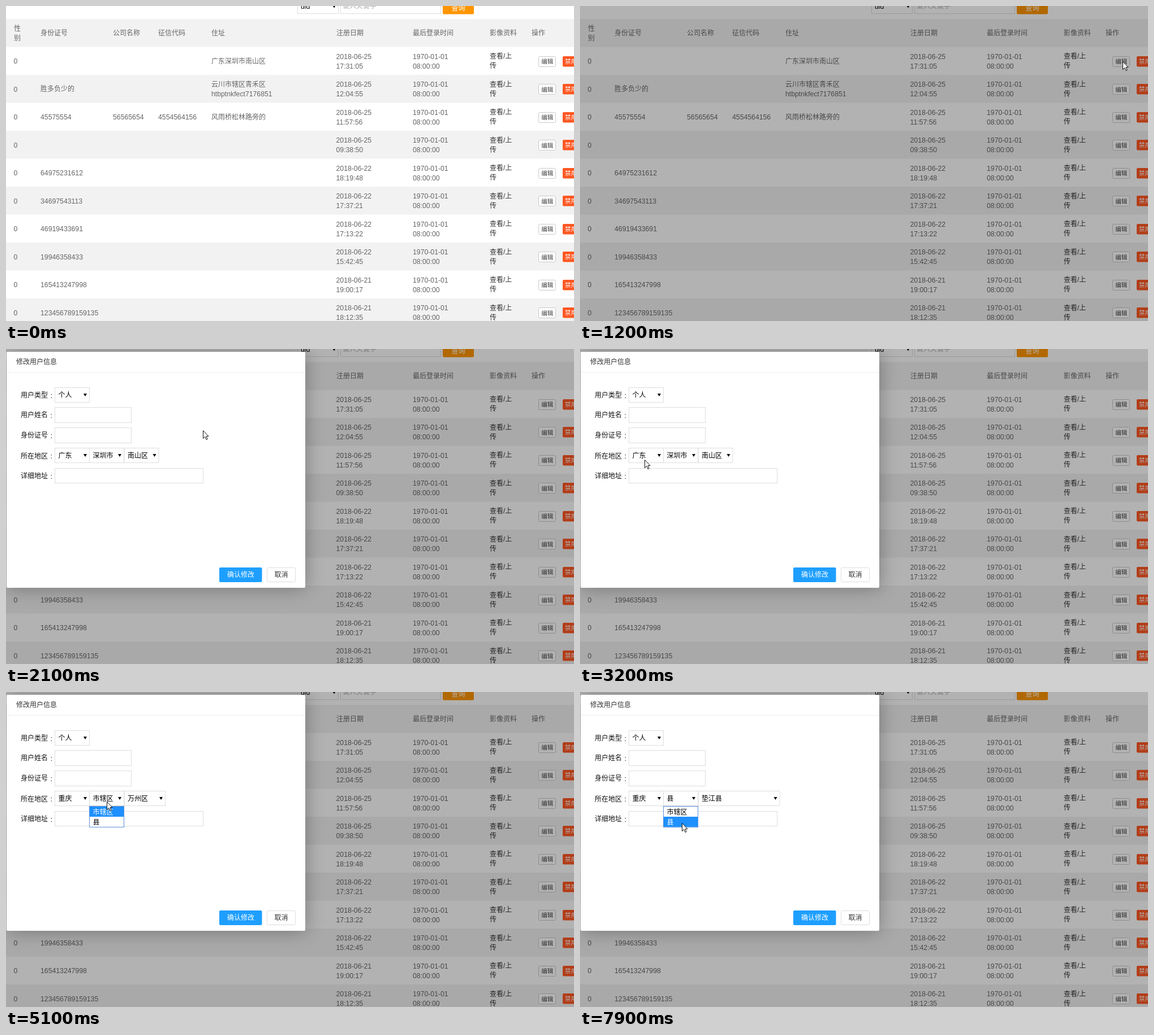
An HTML page that plays this animation: 1004x558 px, repeating every 8000 ms.

```html
<!DOCTYPE html>
<html lang="zh-CN">
<head>
<meta charset="utf-8">
<title>修改用户信息</title>
<style>
  html, body { margin: 0; width: 100%; height: 100%; overflow: hidden; background: #fff; }
  svg { display: block; width: 1004px; height: 558px;
        font-family: 'Liberation Sans', 'Noto Sans CJK SC', 'Noto Sans CJK', sans-serif; }
</style>
</head>
<body>
<svg id="stage" viewBox="0 0 1004 558"></svg>
<script>
const LOOP = 8000;
const stage = document.getElementById('stage');

function add(parent, tag, attrs = {}, content) {
  const el = document.createElementNS('http://www.w3.org/2000/svg', tag);
  for (const key in attrs) el.setAttribute(key, attrs[key]);
  if (content !== undefined) el.textContent = content;
  return parent.appendChild(el);
}
const group = parent => add(parent, 'g');
const fillRect = (parent, x, y, width, height, fill, rx = 0) =>
  add(parent, 'rect', { x, y, width, height, fill, rx });
const outline = (parent, x, y, w, h, stroke = '#dedede', fill = '#fff', rx = 0) =>
  add(parent, 'rect', { x: x + .5, y: y + .5, width: w - 1, height: h - 1, fill, stroke, rx });

// y is the vertical middle of the line
function label(parent, x, y, content, fill = '#666', size, anchor = 'start') {
  size = size || (/^[\x20-\x7e]+$/.test(content) ? 12.25 : 12);
  return add(parent, 'text',
    { x, y: y + size * .37, fill, 'font-size': size, 'text-anchor': anchor }, content);
}

// Hard steps: table of [time, value], starting at time 0
function play(el, prop, table) {
  const frames = table.map(([time, value]) =>
    ({ offset: time / LOOP, [prop]: value, easing: 'step-end' }));
  frames.push({ offset: 1, [prop]: table[table.length - 1][1] });
  el.animate(frames, { duration: LOOP, iterations: Infinity });
}
function show(el, from, to = LOOP) {
  const table = from > 0 ? [[0, 0], [from, 1]] : [[0, 1]];
  if (to < LOOP) table.push([to, 0]);
  play(el, 'opacity', table);
  return el;
}
const arrow = (parent, x, y) =>
  add(parent, 'path', { d: `M${x - 3} ${y - 2.5}h6l-3 5z`, fill: '#000' });

// Page behind the dialog
const ROW = 49.5, TOP = 72.5;
const ROWS = [
  { day: '25', time: '17:31:05', address: ['广东深圳市南山区'] },
  { day: '25', time: '12:04:55', id: '胜多负少的', address: ['云川市辖区青禾区', 'htbptnkfect7176851'] },
  { day: '25', time: '11:57:56', id: '45575554', company: '56565654', code: '4554564156',
    address: ['风雨桥松林路旁的'] },
  { day: '25', time: '09:38:50' },
  { day: '22', time: '18:19:48', id: '64975231612' },
  { day: '22', time: '17:37:21', id: '34697543113' },
  { day: '22', time: '17:13:22', id: '46919433691' },
  { day: '22', time: '15:42:45', id: '19946358433' },
  { day: '21', time: '19:00:17', id: '165413247998' },
  { day: '21', time: '18:12:35', id: '123456789159135' }
];
const page = group(stage);

function lines(x, y, list, fill) {
  list.forEach((s, i) => label(page, x, y + (i - (list.length - 1) / 2) * 17, s, fill));
}

function drawPage() {
  fillRect(page, 0, 0, 1004, 558, '#fff');
  outline(page, 515, -12, 73, 26);
  label(page, 521, 0, 'uid', '#000', 12.25);
  arrow(page, 580, 1);
  outline(page, 591, -12, 178, 26);
  label(page, 595, 0, '键入关键字', '#aaa');
  fillRect(page, 772, -12, 55, 26.5, '#ff9500', 2);
  label(page, 799.5, 3, '查询', '#fff', 12.25, 'middle');

  fillRect(page, 0, 23, 1004, 49.5, '#f2f2f2');
  const heads = [[61, '身份证号'], [189, '公司名称'], [269, '征信代码'], [363, '住址'],
    [584, '注册日期'], [719, '最后登录时间'], [855, '影像资料'], [929, '操作']];
  lines(14, 48, ['性', '别']);
  heads.forEach(([x, s]) => label(page, x, 48, s));
  for (let i = 1; i < ROWS.length; i += 2)
    fillRect(page, 0, Math.floor(TOP + ROW * i), 1004, ROW, '#f2f2f2');

  const hover = fillRect(page, 0, TOP, 1004, ROW, '#f1f1f1');
  show(hover, 200, 1200);
  play(hover, 'transform', [[0, 8], [300, 7], [400, 5], [500, 4], [600, 2], [700, 1], [800, 0]]
    .map(([t, row]) => [t, `translateY(${row * ROW}px)`]));

  ROWS.forEach(({ id, company, code, address = [], day, time }, i) => {
    const y = 97.5 + ROW * i, edge = Math.floor(y - 8.5);
    label(page, 13.5, y, '0');
    [[61, id], [189, company], [269, code]].forEach(([x, s]) => s && label(page, x, y, s));
    lines(363, y, address);
    lines(583.5, y, [`2018-06-${day}`, time]);
    lines(719, y, ['1970-01-01', '08:00:00']);
    lines(855, y, ['查看/上', '传'], '#333');
    outline(page, 941, edge, 31, 19, '#c9c9c9', '#fff', 2);
    if (!i) show(outline(page, 941, edge, 31, 19, '#ff9f1a', '#fff', 2), 800, 1200);
    label(page, 956.8, y + 1, '编辑', '#444', 10.5, 'middle');
    fillRect(page, 984, edge, 40, 18.5, '#ff5722', 2);
    label(page, 988, y + .5, '禁用', '#fff', 10.5);
  });
}

// Dialog
function select(parent, x, y, w, value) {
  outline(parent, x, y, w, 27);
  label(parent, x + 6.5, y + 14, value, '#000');
  arrow(parent, x + w - 8, y + 13.5);
}

function drawDialog() {
  show(fillRect(stage, 0, 0, 1004, 558, 'rgba(0,0,0,.3)'), 1200);
  const dialog = show(group(stage), 1300);
  play(dialog, 'transform', [[0, 'translateY(300px)'], [1400, 'translateY(12px)'],
    [1500, 'translateY(0px)']]);

  const panel = fillRect(dialog, 1, 5, 528, 418, '#fff', 2);
  panel.style.filter = 'drop-shadow(1px 1px 16px rgba(0,0,0,.3))';
  show(fillRect(dialog, 1, 5, 528, 36, '#e6f3fd', 2), 1300, 1500);
  fillRect(dialog, 1, 41, 528, 1, '#eee');
  label(dialog, 18, 23, '修改用户信息', '#333');

  [['用户类型', 82], ['用户姓名', 117], ['身份证号', 153], ['所在地区', 189.5], ['详细地址', 225]]
    .forEach(([s, y]) => {
      label(dialog, 26, y, s, '#111');
      label(dialog, 78.5, y, ':', '#111');
    });
  select(dialog, 86, 68, 62, '个人');
  outline(dialog, 86, 103, 136, 28);
  outline(dialog, 86, 139, 136, 28);
  outline(dialog, 86, 211, 263, 27);

  [[86, 62, '广东', 0, 4600], [86, 62, '重庆', 4600],
   [147, 62, '深圳市', 0, 4600], [147, 62, '市辖区', 4600, 5800], [147, 62, '县', 5800],
   [208.5, 62, '南山区', 0, 4600], [208.5, 73.5, '万州区', 4600, 5800],
   [208.5, 145, '城口县', 5800, 6800], [208.5, 145, '垫江县', 6800]]
    .forEach(([x, w, s, from, to]) => select(show(group(dialog), from, to), x, 175, w, s));

  fillRect(dialog, 377, 387, 75.5, 26, '#1e9fff', 2);
  label(dialog, 415, 400, '确认修改', '#fff', 12, 'middle').setAttribute('font-weight', 500);
  outline(dialog, 461, 387, 51, 26, '#dedede', '#fff', 2);
  label(dialog, 486.5, 400, '取消', '#333', 12, 'middle');
}

// Drop-down lists; hover is a table of [time, row]
const ITEM = 17.93;
function popup(x, w, items, to, hover) {
  const list = show(group(stage), hover[0][0], to);
  outline(list, x, 202, w, items.length * ITEM + 2, '#5b8fd9');
  const middle = row => 212.3 + row * ITEM;
  items.forEach((s, row) => label(list, x + 6.5, middle(row), s, '#000'));
  hover.forEach(([from, row], i) => {
    const mark = show(group(list), from, i + 1 < hover.length ? hover[i + 1][0] : to);
    fillRect(mark, x + 1, 203 + row * ITEM, w - 2, ITEM, '#1e90ff');
    label(mark, x + 6.5, middle(row), items[row], '#fff');
  });
  return list;
}

function drawPopups() {
  const provinces = ('北京 上海 天津 重庆 四川 贵州 云南 西藏 河南 湖北 湖南 ' +
    '广东 广西 陕西 甘肃 青海 宁夏 新疆 河北 山西').split(' ');
  const counties = ('城口县 丰都县 垫江县 忠县 云阳县 奉节县 巫山县 巫溪县 石柱土家族自治县 ' +
    '秀山土家族苗族自治县 酉阳土家族苗族自治县 彭水苗族土家族自治县').split(' ');
  const districts = ['市辖区', '县'];

  const list = popup(86, 62, provinces, 4600,
    [[3400, 11], [3700, 0], [3800, 3], [3900, 6], [4000, 9], [4100, 4], [4300, 3]]);
  fillRect(list, 132, 203, 15, 355, '#f1f1f1');
  fillRect(list, 133, 218, 13, 200, '#c1c1c1');
  add(list, 'path', { d: 'M136 212h7l-3.5-4z', fill: '#a3a3a3' });
  add(list, 'path', { d: 'M136 548h7l-3.5 4z', fill: '#505050' });

  popup(147, 62, districts, 5800, [[5100, 0], [5300, 1]]);
  popup(208.5, 145.5, counties, 6800, [[6300, 0], [6400, 2]]);
  popup(147, 62, districts, LOOP, [[7300, 1], [7400, 0], [7600, 1]]);
}

// Pointer legs: [start time, steps of 100 ms, end x, end y]
const LEGS = [
  [200, 4, 880, 300], [600, 2, 952, 130], [800, 1, 961, 101], [1100, 1, 960, 99],
  [1200, 1, 959, 98], [1700, 2, 789, 127], [1900, 2, 434, 174], [2100, 2, 262, 114],
  [2300, 1, 112, 95], [2400, 1, 118, 75], [2600, 1, 124, 78], [2800, 2, 141, 132],
  [3000, 1, 150, 152], [3100, 2, 114, 196], [3700, 1, 112, 215], [3800, 3, 111, 378],
  [4100, 1, 112, 282], [4300, 1, 113, 268], [4700, 4, 178, 194], [5200, 2, 175, 224],
  [5400, 1, 171, 237], [5500, 1, 169, 233], [5900, 1, 178, 228], [6100, 2, 245, 193],
  [6400, 1, 246, 254], [6600, 1, 247, 255], [6900, 4, 181, 185], [7400, 3, 176, 223],
  [7900, 1, 180, 232]
];
function pointerPath() {
  let x = 540, y = 570;
  const place = (px, py) => `translate(${px}px, ${py}px)`;
  const table = [[0, place(x, y)]];
  for (const [start, steps, endX, endY] of LEGS) {
    for (let k = 1; k <= steps; k++) {
      const part = k / steps;
      table.push([start + (k - 1) * 100,
        place(Math.round(x + (endX - x) * part), Math.round(y + (endY - y) * part))]);
    }
    x = endX;
    y = endY;
  }
  return table;
}
function drawPointer() {
  const pointer = group(stage);
  play(pointer, 'transform', pointerPath());
  const shape = d => add(pointer, 'path',
    { d, fill: '#fff', stroke: '#111', 'stroke-width': 1, 'stroke-linejoin': 'round' });
  play(shape('M.5.5V14.5L3.8 11.4L6 16.5L8.2 15.6L6 10.6H10Z'), 'opacity',
    [[0, 1], [800, 0], [1200, 1]]);
  show(shape('M0 0c1 0 1.5.7 1.5 1.5V7c0-1 3-1 3 .5 0-1 2.6-.8 2.6.8 0-.8 2.3-.6 2.3 1V13' +
    'l-1.5 5H1.5L-3 11.5c-1-1.5.7-2.6 1.8-1.2V1.5C-1.2.7-.7 0 0 0Z'), 800, 1200);
}

drawPage();
drawDialog();
drawPopups();
drawPointer();
</script>
</body>
</html>
```
